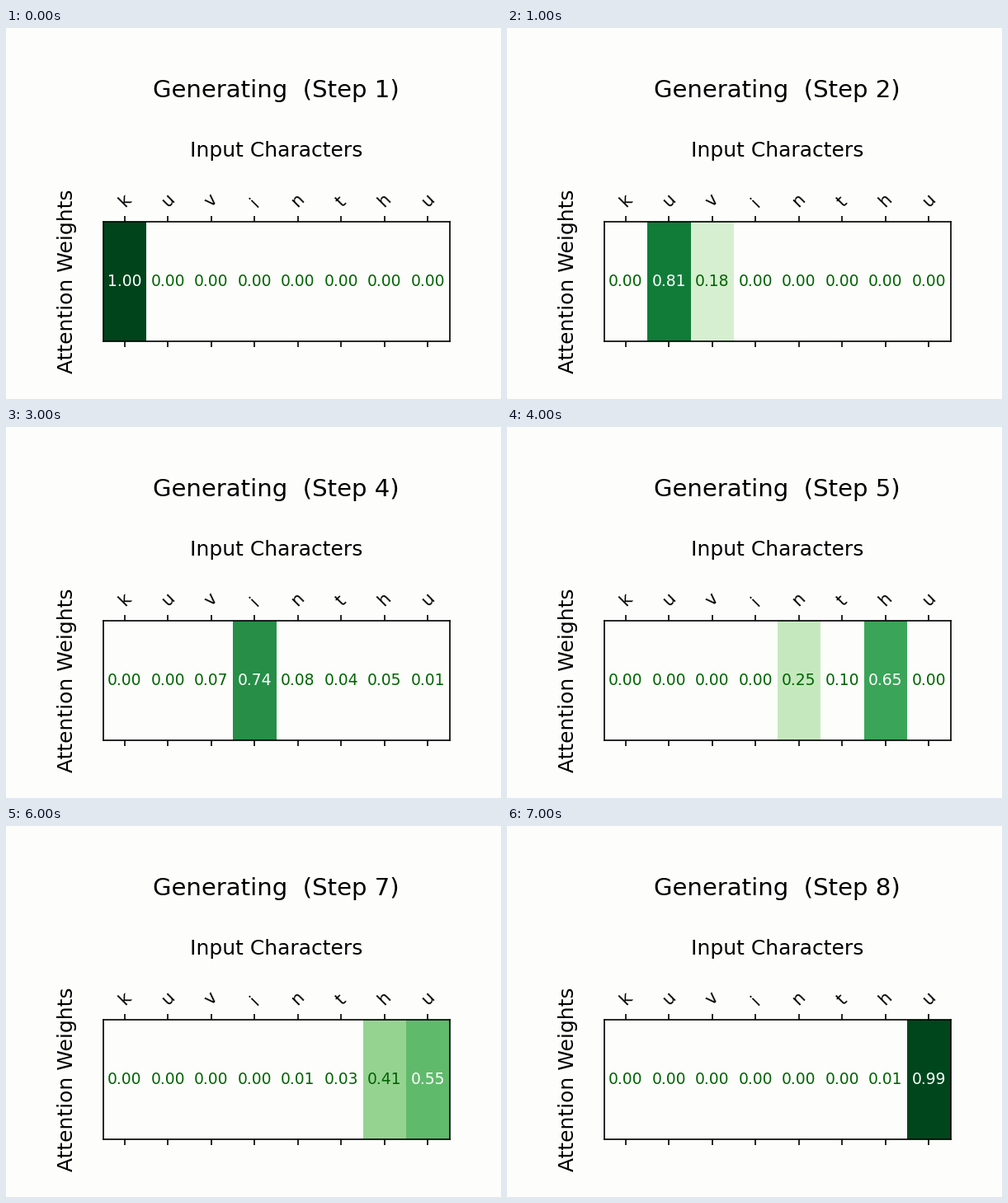
These frames come from a looping animation (600 by 450 pixels, 8000 ms). A matplotlib script:

```python
import numpy as np
import matplotlib.pyplot as plt
from matplotlib.animation import FuncAnimation

W, H, DPI = 600, 450, 150
PAPER = "#fdfefc"
FAINT = 0.15  # weights below this leave the cell unshaded

chars = list("kuvinthu")
count = len(chars)

# Attention that leaks from the current character: step -> {offset: weight}
leaks = {
    1: {1: 0.184, 2: 0.004},
    2: {-1: 0.01, 1: 0.06},
    3: {-1: 0.073, 1: 0.083, 2: 0.043, 3: 0.053, 4: 0.01},
    4: {1: 0.10, 2: 0.65},
    5: {-2: 0.01, -1: 0.02, 1: 0.43, 2: 0.03},
    6: {-2: 0.01, -1: 0.03, 1: 0.55},
    7: {-1: 0.01},
}


def attention(step):
    """Each step attends to its own character, minus what leaks to others."""
    row = np.zeros(count)
    for offset, weight in leaks.get(step, {}).items():
        row[step + offset] = weight
    row[step] = 1 - row.sum()
    return row


def shade(row):
    return np.ma.masked_less(row[np.newaxis], FAINT)


plt.rcParams["font.family"] = "DejaVu Sans"
fig = plt.figure(figsize=(W / DPI, H / DPI), dpi=DPI, facecolor=PAPER)

left, right, top, bottom = 117.72, 537.5, 235, 380
ax = fig.add_axes([left / W, 1 - bottom / H,
                   (right - left) / W, (bottom - top) / H], facecolor=PAPER)


def heading(y, text, size):
    return fig.text((left + right) / 2 / W, 1 - y / H, text, fontsize=size,
                    ha="center", va="baseline")


cells = ax.imshow(shade(attention(0)), cmap="Greens", vmin=0, vmax=1,
                  aspect="auto", interpolation="nearest")
ax.set_xticks(range(count), chars, rotation=45)
ax.set_yticks([])
ax.tick_params(axis="x", top=True, bottom=True,
               labeltop=True, labelbottom=False)
ax.set_ylabel("Attention Weights", fontsize=12, labelpad=15)

title = heading(84, "", 14)
heading(156, "Input Characters", 12)
values = [ax.text(i, 0, "", fontsize=9, ha="center", va="center")
          for i in range(count)]


def draw(step):
    row = attention(step)
    cells.set_data(shade(row))
    title.set_text(f"Generating  (Step {step + 1})")
    for label, weight in zip(values, row):
        label.set_text(f"{weight:.2f}")
        label.set_color("white" if weight > 0.5 else "darkgreen")
    return [cells, title, *values]


anim = FuncAnimation(fig, draw, frames=count, interval=1000,
                     repeat=True, repeat_delay=0, blit=False)
plt.show()
```
